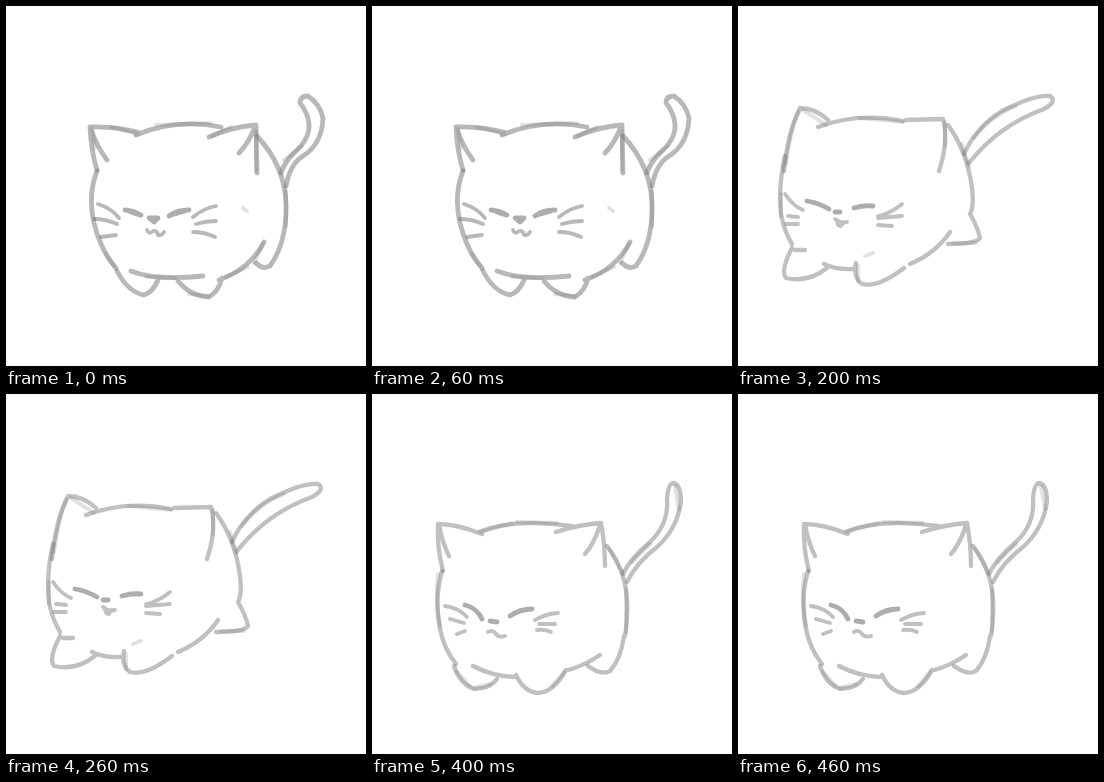
Animation of 360x360 px, one loop 0.5 s. Source, as an HTML page:

```html
<!DOCTYPE html>
<html lang="en">
<head>
<meta charset="utf-8">
<title>Hopping cat sketch</title>
<style>
  html, body { margin: 0; width: 100%; height: 100%; overflow: hidden; background: #fff; }
  svg { display: block; width: 100vw; height: 100vh; }
  g { fill: none; stroke: #777; stroke-opacity: .46; stroke-width: 4.3; stroke-linecap: round; stroke-linejoin: round; filter: blur(.7px); visibility: hidden; }
  .bold { stroke-opacity: .52; stroke-width: 4.8; }
  .face { stroke-width: 3.8; }
  .eyes { stroke-width: 4.8; stroke-opacity: .6; }
  .shade { stroke-width: 4; stroke-opacity: .22; }
</style>
</head>
<body>
<svg viewBox="0 0 360 360">
  <!-- standing -->
  <g class="bold">
    <path d="M91 164Q85 145 84 121Q109 120 135 127M84 121Q91 141 101 154M130 129Q170 112 215 121M203 131Q225 121 250 119L251 167M249 121Q242 138 233 147"/>
    <path d="M91 165Q78 198 95 238Q101 252 110 262M251 130Q279 160 280 198Q281 236 264 260Q257 264 250 257"/>
    <path d="M111 265Q122 286 138 289Q147 286 152 274M125 265Q150 275 197 270M172 275Q184 290 203 291Q213 285 216 272M213 274Q244 263 258 236"/>
    <path d="M275 167Q278 157 288 147Q304 133 303 118Q302 107 294 97Q294 90 302 90Q314 98 317 112Q316 138 297 150Q284 158 280 180"/>
    <path class="face" d="M92 198Q105 202 113 212M88 213Q100 213 111 218M95 231L110 229M187 211Q198 202 210 200M190 218Q200 215 210 215M187 226Q199 226 209 231M141 224q2 5 6 1q4-1 5 4q4 1 6-3"/>
    <path class="eyes" d="M119 204q9 1 16 5M125 206l9 3M163 210q8-6 20-6M165 209l14-4M143 212h9l-4 4z"/>
    <path class="shade" d="M86 123L89 142M105 121L132 128M150 119L205 117M250 125V165M206 130L225 121M257 238L248 257M100 248L108 260M140 271L170 272M183 288L203 290M220 271L242 261M278 154L296 140M280 185V220M237 202l4 3"/>
  </g>
  <!-- leaping -->
  <g>
    <path d="M85 145Q86 102 104 77Q118 82 136 97M135 98Q172 94 200 103M184 111Q210 103 238 97L239 140"/>
    <path d="M83 143Q72 165 74 195Q76 212 88 226M245 112Q264 128 268 160Q271 185 264 207M265 205Q270 225 264 230Q255 232 240 227M211 244Q232 236 248 212"/>
    <path d="M89 232Q84 258 100 262Q118 262 125 249M95 226L106 226M124 246Q138 250 152 249M160 243Q156 265 175 266Q195 264 206 241M166 236Q174 228 190 233Q199 236 202 241"/>
    <path d="M260 130Q280 98 310 90Q340 84 346 93Q346 99 330 100Q295 107 264 142"/>
    <path class="face" d="M78 170q8 12 20 18M78 184q8 7 18 10M82 207l12-2M176 192q12-4 25-12M177 197q12 1 24-1M175 205l12 2M131 199l6-2q3 5 10 4q-4 0-7 6q-4 6-5 6q-4-4-4-14M236 103Q224 120 217 139M237 115L230 141"/>
    <path class="eyes" d="M109 180q8 1 14 6M150 184q10-2 20-1M134 189h5"/>
    <path class="shade" d="M103 80Q95 95 93 117M108 82L134 97M188 110L235 99M258 130L263 165M74 172V193M240 227L265 230M192 261L205 243M265 125L285 105M266 208V226"/>
  </g>
  <!-- landing -->
  <g>
    <path d="M46 165Q50 125 62 102Q77 102 90 114M80 121Q120 106 165 115M168 114L205 113Q211 135 201 165"/>
    <path d="M47 150Q40 180 43 208Q46 225 54 238M210 119Q229 145 234 182Q236 198 233 206M232 208Q240 222 242 232Q238 238 210 238M172 258Q198 247 212 226"/>
    <path d="M54 242Q42 265 48 272Q70 277 89 262M57 244l10 0M86 258Q98 264 115 263M118 257Q115 272 124 278Q140 282 166 262"/>
    <path d="M226 148Q238 121 264 105Q297 88 312 90Q320 95 306 103Q261 119 231 157"/>
    <path class="face" d="M47 188q8 12 18 16M50 210l10 1M48 218h12M140 210q12-2 24-12M140 212l24-2M140 219l14 1M97 213q4 4 12 3q-5 0-6 4q-4 0-4-6"/>
    <path class="eyes" d="M69 195q12 2 22 8M116 202q10-3 19-2M97 206h5"/>
    <path class="shade" d="M61 106Q53 120 48 158M65 104L88 119M122 112L165 116M207 116V140M224 138L231 160M236 132Q255 108 278 100M43 188V210M120 260V275M215 237H238M127 250l8-3"/>
  </g>
  <!-- crouching -->
  <g>
    <path d="M60 178Q54 155 54 120Q80 124 106 126M54 121Q58 145 66 160M92 128Q130 116 182 123L223 119M219 122L216 168"/>
    <path class="bold" d="M60 178Q52 205 58 230Q61 243 67 251M220 133L239 174Q245 190 243 216M67 250Q72 278 85 286Q100 288 112 270"/>
    <path d="M246 215Q251 243 245 250Q230 256 218 246M180 266Q210 256 223 235M85 260Q108 268 131 267M130 268Q138 288 152 289Q166 286 181 264"/>
    <path d="M239 160Q253 129 274 107Q296 87 314 83Q325 85 317 94Q299 109 282 119Q259 140 242 176"/>
    <path class="face" d="M62 211q10 1 21 8M64 222q8 0 18 5M70 232l8 1M152 219q10-5 26-6M155 227h14M151 235l11-1"/>
    <path class="eyes" d="M87 209q10 4 17 11M131 217q8-4 18-6M111 221h6M111 231l5 3 8 0M112 233l6-1"/>
    <path class="shade" d="M54 122L60 149M68 122L104 127M142 120L180 122M219 126L214 154M222 128L240 167M58 185V225M70 262L82 283M85 285L108 274M242 190V215M242 172L262 138M184 264L205 254"/>
  </g>
  <!-- rising -->
  <g>
    <path d="M71 177Q65 155 66 130Q85 130 110 140M67 130Q70 148 77 162M107 138Q140 124 200 132M184 138Q205 131 229 129Q233 150 233 172M228 131Q222 150 213 160"/>
    <path d="M70 177Q62 205 68 235Q72 255 84 270M235 152Q253 175 255 205Q256 225 253 242M252 242Q249 265 238 277Q230 282 216 272"/>
    <path d="M82 272Q88 290 102 295Q118 295 125 285M101 272Q120 282 142 283M144 281Q152 298 166 299Q182 298 194 276M193 277Q212 272 228 261"/>
    <path d="M251 180Q258 165 278 148Q297 130 295 105Q296 90 301 89Q309 90 309 108Q305 135 285 153Q265 168 255 188"/>
    <path class="face" d="M73 212q14 2 22 11M78 225l14 4M85 240l8-3M163 226q10-6 23-7M167 230h16M165 236q8-1 14 2M116 238q5-3 8 2q3 4 9 2"/>
    <path class="eyes" d="M93 211q12 3 17 14M138 222q10-7 22-7M118 227l7 1"/>
    <path class="shade" d="M66 180Q63 205 68 232M108 138L140 129M145 128L185 129M237 155L250 178M254 195V238M85 278L98 292M102 294L118 290M180 292L192 278M303 92L307 115M260 168L278 150"/>
  </g>
</svg>
<script>
  const HOLD = 100;
  const poses = document.querySelectorAll('g');

  function draw(time) {
    const current = Math.floor(time / HOLD) % poses.length;
    poses.forEach((pose, i) => {
      pose.style.visibility = i === current ? 'visible' : 'hidden';
    });
  }

  function tick() {
    draw(performance.now());
    requestAnimationFrame(tick);
  }
  draw(0);
  requestAnimationFrame(tick);
</script>
</body>
</html>
```
